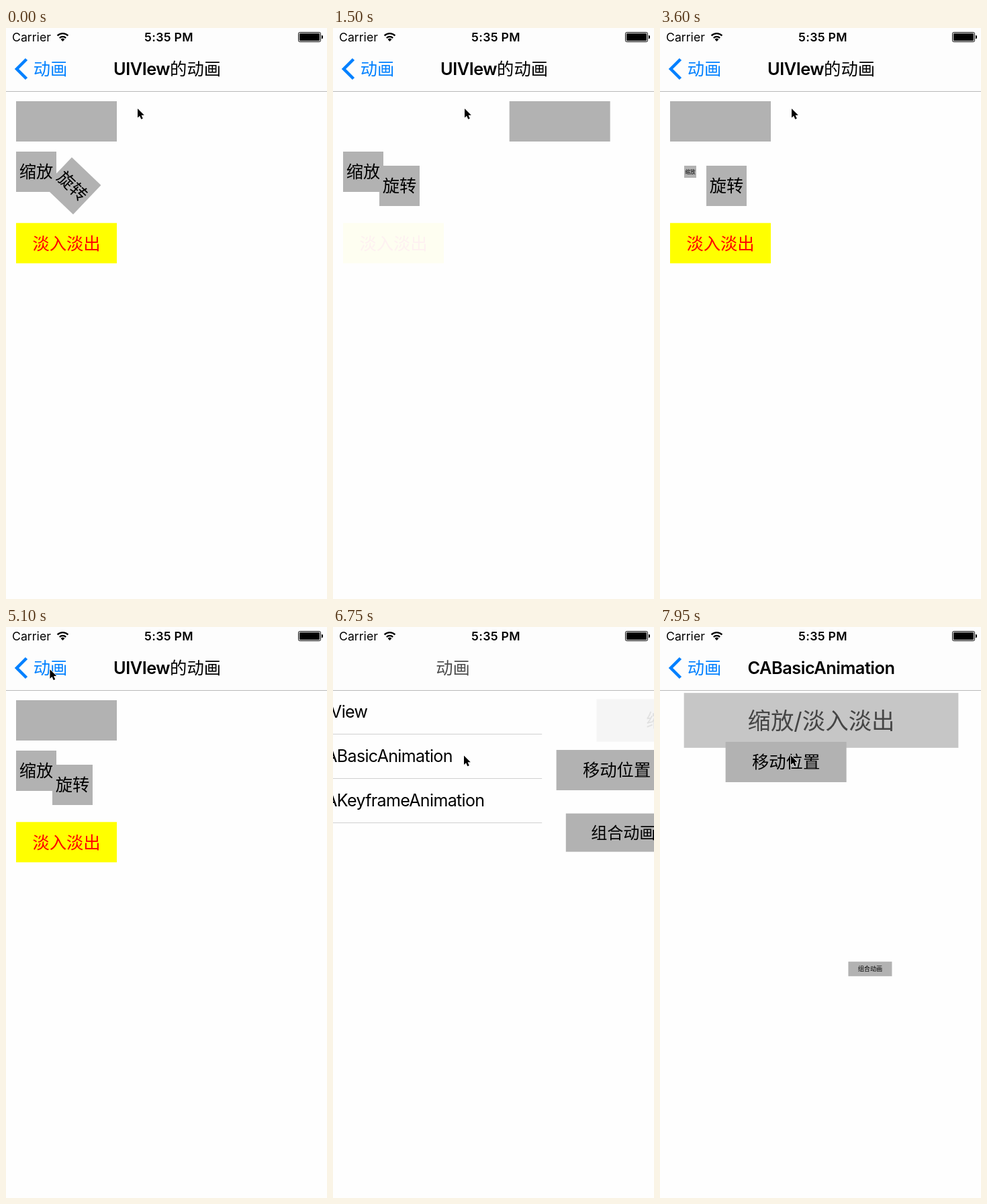
Recreate the animation shown at these times as an HTML page. Size 478 px wide and 850 px high, loop 8000 ms.

```html
<!DOCTYPE html>
<html lang="zh">
<head>
<meta charset="utf-8">
<title>Animation demo</title>
<style>
html, body { margin: 0; width: 100%; height: 100%; overflow: hidden; background: #fefefe; }
svg { display: block; width: 478px; height: 850px; }
text { font-family: Inter, "Noto Sans CJK SC", "Noto Sans CJK", sans-serif; font-size: 25.3px; }
.mid { text-anchor: middle; }
.title { font-weight: 600; letter-spacing: -.45px; }
.title tspan { font-weight: 500; letter-spacing: 0; }
.row { font-size: 25px; letter-spacing: -.65px; }
.status { font-size: 17.7px; }
</style>
</head>
<body>
<svg viewBox="0 0 478 850">
  <rect width="478" height="850" fill="#fefefe"/>

  <g id="list"></g>

  <g id="viewPage">
    <rect y="95" width="478" height="755" fill="#fefefe"/>
    <g id="move"></g>
    <g id="scale"></g>
    <g id="rotate"></g>
    <g id="fade"></g>
  </g>

  <g id="basicPage">
    <rect y="95" width="478" height="755" fill="#fefefe"/>
    <g id="grow"></g>
    <g id="slide"></g>
    <g id="combo"></g>
  </g>

  <rect width="478" height="94" fill="#fdfdfd"/>
  <rect y="94" width="478" height="1" fill="#b8b8b8"/>

  <path id="chevron" d="M30.5 46.5 16 61 30.5 75.5" fill="none" stroke="#0080ff" stroke-width="4.5"/>
  <text id="back" class="mid" x="66" y="70.3" fill="#0080ff">动画</text>
  <text id="rootTitle" class="mid title" x="239" y="70.3"><tspan>动画</tspan></text>
  <text id="viewTitle" class="mid title" x="240" y="70.3">UIVIew<tspan>的动画</tspan></text>
  <text id="basicTitle" class="mid title" x="240" y="70.3">CABasicAnimation</text>

  <text class="status" x="9" y="20">Carrier</text>
  <text class="status mid" x="242.5" y="20" font-weight="600" letter-spacing=".3">5:35 PM</text>
  <g fill="none" stroke="#000" stroke-width="2.3">
    <path d="M76.6 11.4A11.4 11.4 0 0 1 92.4 11.4"/>
    <path d="M79.8 14.8A6.8 6.8 0 0 1 89.2 14.8"/>
  </g>
  <path d="M84.5 20 81.6 17A4.2 4.2 0 0 1 87.4 17Z"/>
  <rect x="435.5" y="6.5" width="33" height="14" rx="2" fill="none" stroke="#000"/>
  <rect x="437" y="8" width="30" height="11" rx=".8"/>
  <path d="M470 11h.6a1.4 1.4 0 0 1 1.4 1.4v2.2a1.4 1.4 0 0 1-1.4 1.4h-.6z"/>

  <path id="cursor" d="M0 0V13.6L3.1 10.8 5.3 15.8 7.8 14.7 5.6 9.8H9.8Z" stroke="#fff" stroke-width="1.4" paint-order="stroke"/>
</svg>
<script>
const LOOP = 8000, WIDTH = 478, PARALLAX = 143;
const POP = 5630, PUSH = 6650, NAV_TIME = 720;
const el = id => document.getElementById(id);
const clamp = v => Math.max(0, Math.min(1, v));
const mix = (a, b, k) => a + (b - a) * k;

// Timing curve with handles (x1, 0) and (x2, 1)
function bezier(x1, x2) {
  return x => {
    let lo = 0, hi = 1;
    for (let i = 0; i < 24; i++) {
      const s = (lo + hi) / 2, r = 1 - s;
      if (3 * x1 * s * r * r + 3 * x2 * s * s * r + s * s * s < x) lo = s; else hi = s;
    }
    return lo * lo * (3 - 2 * lo);
  };
}
const easeInOut = bezier(.42, .58);
const easeOut = bezier(0, .58);

// Up and back down again around a peak
const swing = (t, peak, span) => clamp(1 - Math.abs(t - peak) / span);

function spring(ms) {
  if (ms <= 0) return 0;
  if (ms >= NAV_TIME) return 1;
  const k = ms * .0122;
  return 1 - (1 + k) * Math.exp(-k);
}

function box(id, w, h, label = "", fill = "#b2b2b2", ink = "#000") {
  el(id).innerHTML =
    `<rect x="${-w / 2}" y="${-h / 2}" width="${w}" height="${h}" fill="${fill}"/>` +
    `<text class="mid" y="9.3" fill="${ink}">${label}</text>`;
}

function place(id, x, y = 0, extra = "") {
  el(id).setAttribute("transform", `translate(${x} ${y}) ${extra}`);
}

function alpha(id, a) {
  el(id).setAttribute("opacity", a);
}

function build() {
  box("move", 150, 60);
  box("scale", 60, 60, "缩放");
  box("rotate", 60, 60, "旋转");
  box("fade", 150, 60, "淡入淡出", "#ff0", "#f00");
  box("grow", 300, 60, "缩放/淡入淡出");
  box("slide", 180, 60, "移动位置");
  box("combo", 180, 60, "组合动画");
  el("list").innerHTML = ["UIView", "CABasicAnimation", "CAKeyframeAnimation"].map((name, i) =>
    `<text class="row" x="22" y="${135 + 66 * i}">${name}</text>` +
    `<rect x="22" y="${159 + 66 * i}" width="600" height="1" fill="#d0d0d0"/>`).join("");
}

function drawViewPage(t) {
  place("move", mix(90, 375, easeInOut(swing(t, 1350, 600))), 139);
  place("scale", 45, 214, `scale(${mix(1, .17, easeInOut(swing(t, 3175, 1553)))})`);
  place("rotate", 99, 235, `rotate(${90 * easeInOut(swing(t, 383, 751))})`);
  place("fade", 90, 320.3);
  alpha("fade", 1 - easeOut(swing(t, 1800, 1750)));
}

function drawBasicPage(t) {
  const p = swing(t, 7666, 1034);
  const ms = Math.max(0, t - PUSH);
  place("grow", 240, 139, `scale(${1 + p / 2})`);
  alpha("grow", p);
  place("slide", 105 + ms * .0635, 214 - ms * .01);
  place("combo", 105 + ms * .1598, 289 + ms * .1691, `scale(${1 - ms * .000491})`);
}

function drawNav(t) {
  const pushing = t >= PUSH;
  const ms = t - (pushing ? PUSH : POP);
  const p = spring(ms);
  const shown = pushing ? p : 1 - p;
  const fadeIn = clamp((ms - 320) / 250);
  const fadeOut = Math.pow(1 - p, .85);
  const detail = pushing ? fadeIn : fadeOut;

  place("list", -PARALLAX * shown);
  place("viewPage", pushing ? WIDTH : WIDTH * (1 - shown));
  place("basicPage", pushing ? WIDTH * (1 - shown) : WIDTH);
  for (const id of ["viewTitle", "basicTitle"]) place(id, 320 * (1 - shown));
  alpha("viewTitle", pushing ? 0 : detail);
  alpha("basicTitle", pushing ? detail : 0);
  place("back", 173 * (1 - shown));
  alpha("back", detail);
  alpha("chevron", detail);
  place("rootTitle", -173 * shown);
  alpha("rootTitle", pushing ? fadeOut : fadeIn);
}

function drawCursor(t) {
  const there = easeInOut(clamp((t - 4700) / 550));
  const next = easeInOut(clamp((t - 6020) / 280));
  place("cursor", mix(mix(196, 42, there), 195, next), mix(mix(120, 53, there), 191.5, next));
}

function draw(t) {
  drawViewPage(t);
  drawBasicPage(t);
  drawNav(t);
  drawCursor(t);
}

function tick() {
  draw(performance.now() % LOOP);
  requestAnimationFrame(tick);
}

build();
tick();
</script>
</body>
</html>
```
